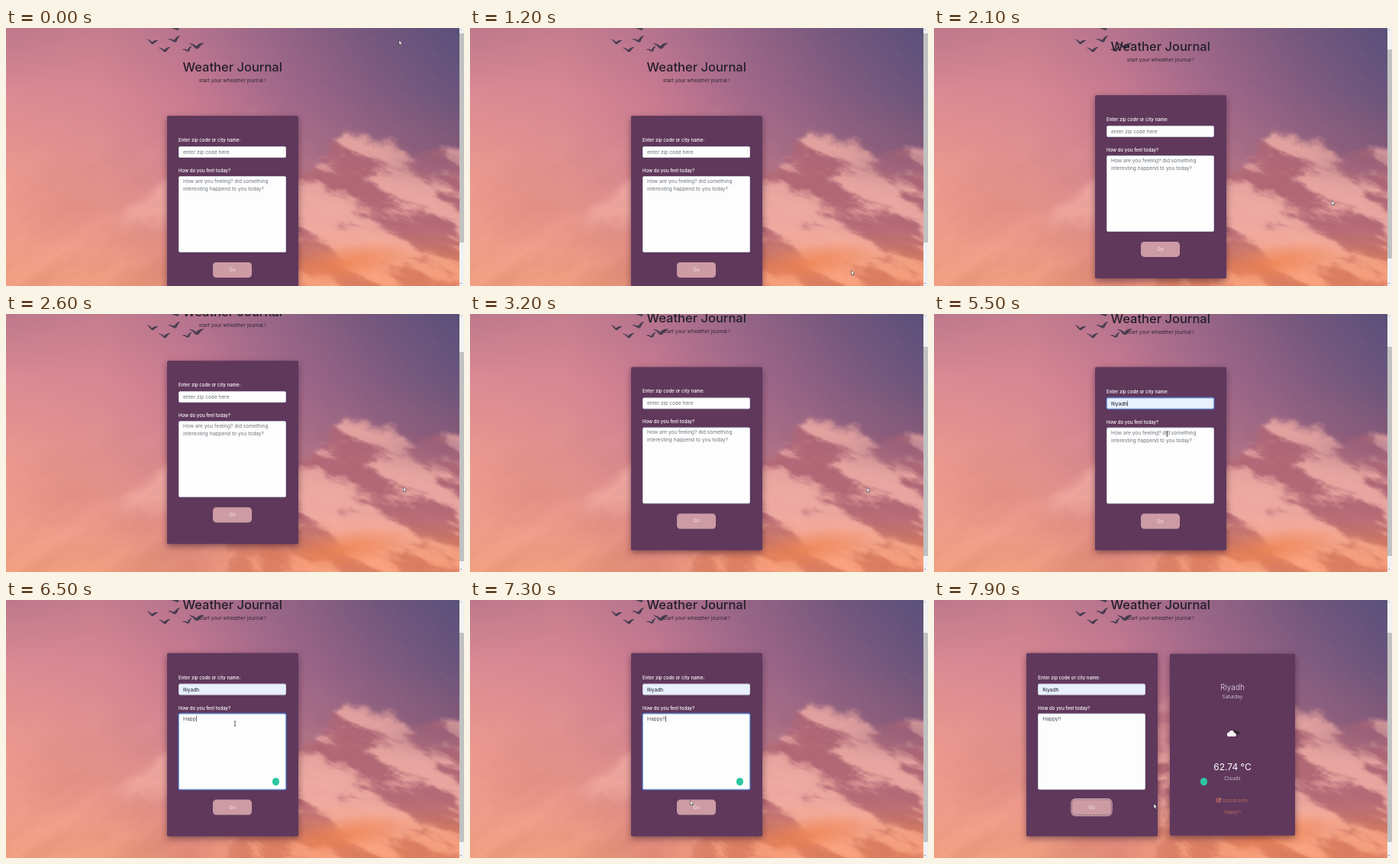
An HTML page with a canvas that plays this animation: 600x338 px, repeating every 8 s.

```html
<!DOCTYPE html>
<html lang="en">
<head>
<meta charset="utf-8">
<title>Weather Journal</title>
<style>
html, body { margin: 0; width: 100%; height: 100%; overflow: hidden; }
body { position: relative; font-family: Inter, "Open Sans", sans-serif; font-size: 6.6px; }
canvas, #page, .abs, .txt, svg { position: absolute; box-sizing: border-box; }
canvas, #page { left: 0; top: 0; }
#page { width: 594px; height: 400px; }
.txt { line-height: 10px; margin-top: -5px; white-space: pre; }
.mid { transform: translateX(-50%); }
.card { background: #5f385c; border-radius: 1.5px; box-shadow: 0 3px 9px rgba(40, 15, 40, .5); color: #fff; }
.label { left: 15.5px; font-size: 6.1px; font-weight: 500; }
.field { left: 15.5px; width: 141px; background: #fdfdfd; border: .4px solid #ced4da; border-radius: 2px; }
.field.focus { border-color: #80a8e0; box-shadow: 0 0 0 1px rgba(60, 120, 215, .4); }
.field.filled { background: #e8f0fe; }
.field .txt { left: 5px; color: #6c757d; }
.field .typed { color: #495057; }
.filled .typed { color: #16181c; }
.caret { display: inline-block; width: .5px; height: 7.5px; background: #777; vertical-align: -1.6px; }
#go { left: 60.5px; top: 192px; width: 51px; height: 20px; border-radius: 4.5px; background: #cd9ba4; }
#go .txt { left: 50%; top: 50%; color: #f5e5e8; font-size: 6.3px; }
#go.focus { box-shadow: 0 0 0 .7px #7d4f68, 0 0 0 1.6px #dfb9bf; }
.soft { color: #eadde8; }
.note { color: #cf7b60; font-weight: 300; }
#badge { left: 348.5px; top: 233px; width: 9.5px; height: 9.5px; border-radius: 50%; background: #2cc6a0; }
#bar { left: 593.5px; top: 0; width: 6.5px; height: 338px; background: #f1f1f1; }
#thumb { left: .5px; width: 5.5px; height: 274px; background: #c1c1c1; }
.tri { left: 1.7px; border: 1.6px solid transparent; }
</style>
</head>
<body>
<canvas id="sky" width="600" height="338"></canvas>

<div id="page">
  <div class="txt mid" style="left:296.7px;top:51px;font-size:16.5px;font-weight:500;color:#24202b">Weather Journal</div>
  <div class="txt mid" style="left:296.8px;top:69px;color:#2b2531">start your wheather journal !</div>

  <div class="abs card" id="form" style="left:210.5px;top:115px;width:172.5px;height:239.5px">
    <div class="txt label" style="top:32px">Enter zip code or city name:</div>
    <div class="abs field" id="city" style="top:39.5px;height:15px"><div class="txt" style="top:7.3px"></div></div>
    <div class="txt label" style="top:71.5px">How do you feel today?</div>
    <div class="abs field" id="mood" style="top:79px;height:99.5px"><div class="txt" style="top:7.4px;line-height:9.6px"></div></div>
    <div class="abs" id="go"><div class="txt mid">Go</div></div>
  </div>

  <div class="abs card" id="result" style="left:309px;top:116px;width:164px;height:238px">
    <div class="txt mid soft" style="left:82px;top:42.5px;font-size:10.1px;font-weight:300">Riyadh</div>
    <div class="txt mid soft" style="left:82px;top:56px;font-weight:300">Saturday</div>
    <svg style="left:73px;top:98px" width="20" height="13" viewBox="0 0 20 13">
      <g fill="#2e2930"><circle cx="12" cy="4.4" r="2.6"/><circle cx="15.5" cy="5" r="2"/><rect x="10" y="4.4" width="8.5" height="3" rx="1.5"/></g>
      <g fill="#f6f4f5"><circle cx="4.4" cy="7.4" r="2.5"/><circle cx="7.8" cy="5.6" r="3.2"/><circle cx="11.2" cy="7.5" r="2.4"/><rect x="2" y="6.8" width="11.8" height="3.4" rx="1.7"/></g>
    </svg>
    <div class="txt mid" style="left:82px;top:148px;font-size:12px">62.74 °C</div>
    <div class="txt mid soft" style="left:82px;top:163px;font-weight:300">Clouds</div>
    <svg style="left:61px;top:188px" width="8" height="7" viewBox="0 0 8 7" fill="none" stroke="#cf7b60">
      <path d="M4 1.4H.8V6.3H5.7V4.2"/><path d="M2.7 4.5L6.4 .9" stroke-width="1.5"/>
    </svg>
    <div class="txt note" style="left:69.5px;top:191.5px;font-size:6.5px">mood note</div>
    <div class="txt mid note" style="left:82px;top:206.5px;font-size:6.2px">Happy!!</div>
  </div>
</div>

<div class="abs" id="badge"></div>
<div class="abs" id="bar">
  <div class="abs tri" style="top:.8px;border-bottom-color:#777"></div>
  <div class="abs" id="thumb"></div>
  <div class="abs tri" style="top:333.6px;border-top-color:#444"></div>
</div>
<svg id="pointer" style="left:0;top:0" width="8" height="10" viewBox="-3 -1 8 10">
  <path id="arrow" d="M0 0V6L1.4 4.8L2.4 7L3.4 6.5L2.5 4.4H4.3Z" fill="#fff" stroke="#222" stroke-width=".5"/>
  <path id="beam" d="M-1.3 1H1.3M0 1V7M-1.3 7H1.3" fill="none" stroke="#222" stroke-width=".7"/>
</svg>

<script>
const $ = id => document.getElementById(id);
const LOOP = 8000, CLICK = 7500;
const mix = (a, b, k) => a + (b - a) * k;
const smooth = (a, b, v) => {
  const k = Math.min(1, Math.max(0, (v - a) / (b - a)));
  return k * k * (3 - 2 * k);
};

// ---- sky ----
const hash = (x, y) => {
  const s = Math.sin(x * 127.1 + y * 311.7) * 43758.5453;
  return s - Math.floor(s);
};
function noise(x, y) {
  const i = Math.floor(x), j = Math.floor(y);
  const u = smooth(0, 1, x - i), v = smooth(0, 1, y - j);
  return mix(mix(hash(i, j), hash(i + 1, j), u), mix(hash(i, j + 1), hash(i + 1, j + 1), u), v);
}
function fbm(x, y) {
  let sum = 0, amp = .5;
  for (let o = 0; o < 5; o++, amp /= 2, x *= 2.03, y *= 2.03) sum += amp * noise(x + o * 7, y);
  return sum;
}
const rgb = h => [0, 2, 4].map(i => parseInt(h.substr(i, 2), 16));
const mesh = [
  'bc788c c57d8e b4738e 946486 74567d 58507a',
  'da8a92 d88793 c87a91 a3688a 845c82 68537a',
  'e8948f e08f8f d2838f b47389 98657f 86597a',
  'ee9a8c e69288 dc8a88 d48888 cc8888 c07f86',
  'ef9d80 ee9c7e e28c78 e08a70 ea8c68 e88f70'
].map(r => r.split(' ').map(rgb));
const bump = (x, c, w) => Math.exp(-(((x - c) / w) ** 2));

function paintSky() {
  const g = $('sky').getContext('2d'), W = 600, H = 338;
  const img = g.createImageData(W, H);
  for (let x = 0; x < W; x++) {
    const mx = Math.min(4.999, x / 120), i = Math.floor(mx);
    const right = smooth(240, 350, x);
    const angle = mix(-.55, .38, right), cos = Math.cos(angle), sin = Math.sin(angle);
    const topR = 190 - 50 * bump(x, 462, 55) - 32 * bump(x, 575, 60);
    const topL = 256 - .75 * (x - 128);
    for (let y = 0; y < H; y++) {
      const my = Math.min(3.999, y / 84.5), j = Math.floor(my);
      const dx = x - 300, dy = y - 200;
      const streak = fbm((dx * cos + dy * sin) / 70 + 9, (dy * cos - dx * sin) / 22 + 15) - .48;
      const puff = fbm(x / 30, y / 24) - .48;
      const gap = bump(x, 560, 45) * bump(y, 180, 18);
      const veilR = smooth(topR - 5, topR + 14, y + puff * 45) * (1 - .6 * gap) * .8;
      const veilL = smooth(topL - 8, topL + 14, y + puff * 30) * (1 - smooth(238, 275, y + streak * 60))
        * smooth(118, 165, x) * .7;
      const veil = mix(veilL, veilR, right);
      const crest = bump(y, topR + 25, 28) + .6 * bump(x, 450, 80) * bump(y, 230, 35);
      const lit = smooth(-.12, .1, streak + puff * .35 + .09 * crest - .3 * gap + .15 * (1 - right));
      const low = smooth(255, 320, y);
      const dark = [mix(180, 222, low), mix(104, 128, low), mix(118, 98, low)];
      const pale = [mix(241, 246, low), mix(174, 160, low), mix(164, 126, low)];
      for (let c = 0; c < 3; c++) {
        const base = mix(mix(mesh[j][i][c], mesh[j][i + 1][c], mx - i),
                         mix(mesh[j + 1][i][c], mesh[j + 1][i + 1][c], mx - i), my - j);
        img.data[(y * W + x) * 4 + c] = mix(base, mix(dark[c], pale[c], lit), veil) + streak * 22 * smooth(80, 300, y);
      }
      img.data[(y * W + x) * 4 + 3] = 255;
    }
  }
  g.putImageData(img, 0, 0);

  const glow = g.createRadialGradient(0, 0, 0, 0, 0, 1);
  glow.addColorStop(0, 'rgba(238,130,80,.75)');
  glow.addColorStop(1, 'rgba(238,130,80,0)');
  g.save();
  g.translate(445, 308);
  g.rotate(-.2);
  g.scale(85, 24);
  g.fillStyle = glow;
  g.fillRect(-1, -1, 2, 2);
  g.restore();

  for (let k = 0; k < 90; k++) {
    g.fillStyle = `rgba(240,205,220,${.1 + .3 * hash(k, 3)})`;
    g.fillRect(320 + 272 * hash(k, 1), 130 * hash(k, 2), .9, .9);
  }

  // x, y, half span, tilt
  const birds = [[192, 18, 7.5, .05], [208, 28, 8, -.12], [221, 15, 8.5, -.35], [238, 28, 7, -.4],
                 [250, 23, 10, -.1], [224, 0, 7, -.4]];
  g.fillStyle = '#483d52';
  for (const [x, y, s, a] of birds) {
    g.save();
    g.translate(x, y);
    g.rotate(a);
    g.scale(s, s);
    g.beginPath();
    g.moveTo(-1, -.4);
    g.quadraticCurveTo(-.5, -.4, -.1, .06);
    g.quadraticCurveTo(.4, -.4, 1, -.25);
    g.quadraticCurveTo(.5, -.05, .2, .36);
    g.quadraticCurveTo(-.1, .52, -.3, .26);
    g.quadraticCurveTo(-.5, -.1, -1, -.4);
    g.fill();
    g.restore();
  }
}

// ---- timeline: [time, value...] ----
const scrollKeys = [[1650, 0], [2550, 54], [3250, 45.4]];
const pointerKeys = [[100, 515, 16], [1100, 499.5, 317.5], [1200, 499.5, 317.5], [1650, 521, 226],
  [2300, 521, 226], [2900, 520, 227.5], [3300, 520, 227.5], [3900, 352, 113], [5100, 352, 113],
  [5600, 300, 162], [6950, 300, 162], [7350, 288, 267]];
const cityKeys = [[4200, 'r'], [4380, 'ri'], [4550, 'riy'], [5000, 'Riyadh']];
const moodKeys = [[5900, 'H'], [6100, 'Ha'], [6250, 'Hap'], [6400, 'Happ'], [6600, 'Happy'],
  [6750, 'Happy!'], [6880, 'Happy!!']];

function at(keys, t) {
  let n = keys.findIndex(k => k[0] > t);
  if (n < 0) n = keys.length;
  const a = keys[Math.max(0, n - 1)], b = keys[Math.min(n, keys.length - 1)];
  const k = a === b ? 0 : smooth(a[0], b[0], t);
  return a.slice(1).map((v, i) => mix(v, b[i + 1], k));
}
const typed = (keys, t) => keys.reduce((s, k) => t >= k[0] ? k[1] : s, '');

function setField(id, value, hint, focus, t) {
  const box = $(id), text = box.firstElementChild;
  box.classList.toggle('focus', focus);
  text.classList.toggle('typed', !!value);
  text.textContent = value || hint;
  if (focus && t % 1000 < 530) {
    const caret = document.createElement('span');
    caret.className = 'caret';
    if (value) text.append(caret);
    else text.prepend(caret);
  }
}

function draw(t) {
  const [scroll] = at(scrollKeys, t), [px, py] = at(pointerKeys, t);
  const done = t >= CLICK;
  $('page').style.transform = `translateY(${-scroll}px)`;
  $('thumb').style.top = 7 + scroll * .79 + 'px';

  setField('city', typed(cityKeys, t), 'enter zip code here', t >= 4000 && t < 5650, t);
  $('city').classList.toggle('filled', t >= 5000);
  setField('mood', typed(moodKeys, t), 'How are you feeling? did something\ninteresting happend to you today?',
    t >= 5650 && t < CLICK - 100, t);
  $('go').classList.toggle('focus', t >= CLICK - 100);
  $('form').style.left = (done ? 120.8 : 210.5) + 'px';
  $('result').style.display = done ? 'block' : 'none';
  $('badge').style.display = t >= 5800 ? 'block' : 'none';

  const y = py + scroll - 115;
  const over = !done && px > 226 && px < 367 && ((y > 39.5 && y < 54.5) || (y > 79 && y < 178.5));
  $('arrow').style.display = over ? 'none' : 'inline';
  $('beam').style.display = over ? 'inline' : 'none';
  $('pointer').style.transform = `translate(${px - 3}px, ${py - 1 - (over ? 4 : 0)}px)`;
}

paintSky();
const start = performance.now();
function tick() {
  draw((performance.now() - start) % LOOP);
  requestAnimationFrame(tick);
}
tick();
</script>
</body>
</html>
```
